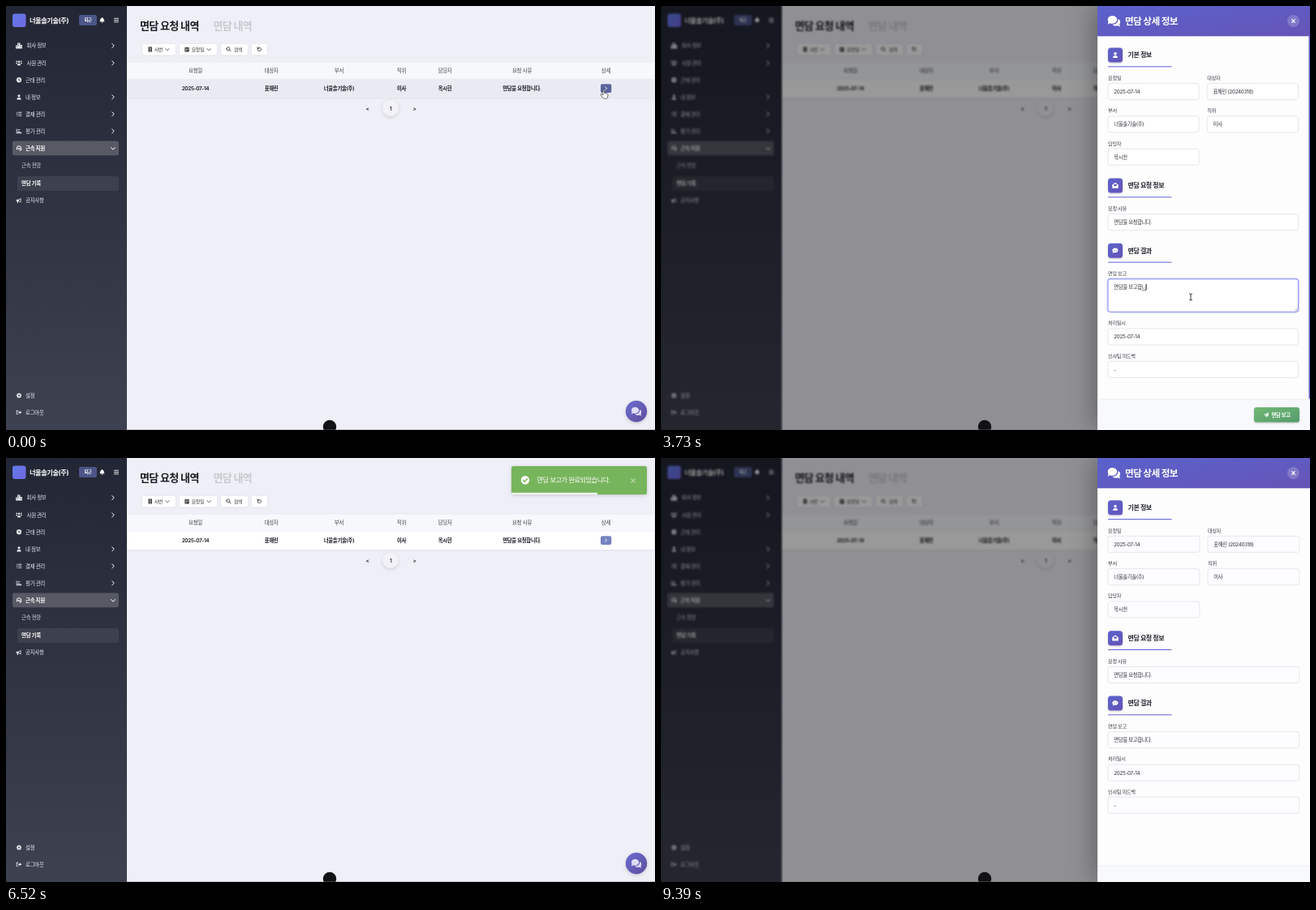
Write an HTML page that moves like this. It is 800 by 523 pixels and loops after 9.42 s.

```html
<!DOCTYPE html>
<html lang="ko">
<head>
<meta charset="utf-8">
<style>
html, body { margin: 0; width: 100%; height: 100%; overflow: hidden; background: #efeff7; }
svg, #shade { position: absolute; left: 0; top: 0; width: 800px; height: 523px; overflow: hidden; }
text { font-family: Inter, "Noto Sans CJK KR", "Noto Sans CJK", sans-serif; letter-spacing: -.05em; white-space: pre; }
#shade { background: rgba(0, 0, 0, .4); backdrop-filter: blur(1.3px); }
#panel { filter: drop-shadow(-6px 0 14px rgba(0, 0, 0, .28)); }
</style>
</head>
<body>
<svg id="page" viewBox="0 0 800 523"></svg>
<div id="shade"></div>
<svg id="badge" viewBox="0 0 800 523"></svg>
<svg id="panel" viewBox="0 0 800 523"></svg>
<svg id="top" viewBox="0 0 800 523"></svg>
<script>
const LOOP = 9420;
const COMPANY = '너울솔기술(주)', MEMBER = '표해린', MANAGER = '옥시헌';
const $ = id => document.getElementById(id);

// Drawing helpers; text is placed by its vertical centre.
const rect = (x, y, w, h, fill, r = 0, more = '') =>
  `<rect x="${x}" y="${y}" width="${w}" height="${h}" rx="${r}" fill="${fill}" ${more}/>`;
const disc = (x, y, r, fill, more = '') => `<circle cx="${x}" cy="${y}" r="${r}" fill="${fill}" ${more}/>`;
const text = (x, y, size, str, fill, weight = 400, anchor = 'start') =>
  `<text x="${x}" y="${y + size * .36}" font-size="${size}" fill="${fill}" font-weight="${weight}" text-anchor="${anchor}">${str}</text>`;
const line = (d, color, width = 1) =>
  `<path d="${d}" fill="none" stroke="${color}" stroke-width="${width}" stroke-linecap="round" stroke-linejoin="round"/>`;
const ring = (x, y, r) => `M${x - r} ${y}a${r} ${r} 0 1 0 ${2 * r} 0a${r} ${r} 0 1 0 ${-2 * r} 0z`;
const gradient = (id, from, to, x2 = 0, y2 = 1) =>
  `<linearGradient id="${id}" x1="0" y1="0" x2="${x2}" y2="${y2}"><stop stop-color="${from}"/><stop offset="1" stop-color="${to}"/></linearGradient>`;
const shadow = (id, dy, blur, opacity) =>
  `<filter id="${id}" x="-30%" y="-50%" width="160%" height="220%"><feDropShadow dx="0" dy="${dy}" stdDeviation="${blur}" flood-opacity="${opacity}"/></filter>`;

// Glyphs on a 16 unit grid.
const gear = Array.from({ length: 8 }, (_, i) => {
  const p = (a, r) => `${8 + r * Math.cos(a)} ${8 + r * Math.sin(a)}`, a = i * Math.PI / 4;
  return `${i ? 'L' : 'M'}${p(a - .24, 7.6)}L${p(a + .24, 7.6)}L${p(a + .36, 5.6)}L${p(a + .43, 5.6)}`;
}).join('') + 'z' + ring(8, 8, 2.4);
const glyphs = {
  city: 'M0 7h4V1h7v5h5v9H0zM6 3h2v2H6zM6 7h2v2H6zM2 9h2v2H2zM12 9h2v2h-2z',
  users: ring(8, 5, 2.6) + ring(2.5, 4, 1.9) + ring(13.5, 4, 1.9) + 'M3.5 14c0-7 9-7 9 0zM0 10c0-4 4-4 4.5-2L3 10zM16 10c0-4-4-4-4.500-2L13 10z',
  clock: ring(8, 8, 7.5) + 'M7 3.500h2v4l3 2-1 1.600-4-2.600z',
  user: ring(8, 4.3, 3.8) + 'M1.500 15.500c0-8.500 13-8.500 13 0z',
  list: 'M6 2h10v2H6zM6 7h10v2H6zM6 12h10v2H6zM0 3l1-1 1 1 2-2 1 1-3 3zM0 8l1-1 1 1 2-2 1 1-3 3zM1 12h2v2H1z',
  chart: 'M0 1h2v12h14v2H0zM4 3h7v2H4zM4 6.500h5v2H4zM4 10h10v2H4z',
  headset: 'M1 9c-1-11 15-11 14 0v3c0 2-2 3-6 3v-2h3V7h1c-2-5-8-5-10 0h1v5H2c-1 0-1-1-1-3zM6 7h4v4H6z',
  horn: 'M0 5h6l8-4v13l-8-4H5l1 5H3l-1-5H0zM8 6v3l4 2V4z',
  gear,
  exit: 'M0 2h6v2H2v8h4v2H0zM5 6.500h5V3l6 5-6 5V9.500H5z',
  bell: 'M7 0h2v1.500c5 1 4 7 6 10.500H1c2-3.500 1-9.500 6-10.500zM6 13h4c0 3-4 3-4 0z',
  card: 'M2 0h12v16H2zM5 3v2h6V3zM5 7v2h2V7zM9 7v2h2V7zM5 11v2h6v-2z',
  date: 'M1 2h3V0h2v2h4V0h2v2h3v14H1zM3 6v2h10V6zM4 10v3h3v-3z',
  chats: 'M6 1c8 0 8 10 0 10-1 0-2 0-3-.5L0 12l1-3C-1 5 1 1 6 1zM13 5c3 1 4 4 2 7l1 3-3-1.500c-3 1-6 0-7-1.500 5 0 8-3 7-7z',
  mail: 'M0 6l8-6 8 6v9H0zM4 4.500v3L8 10l4-2.500v-3z',
  bubble: 'M8 1c10 0 10 12 0 12-1 0-2 0-3-.5L1 15l1-4C-2 7 1 1 8 1z' + ring(4.5, 7, 1) + ring(8, 7, 1) + ring(11.5, 7, 1),
  plane: 'M16 0l-3 14-4-2-3 4v-5l7-8-9 7-4-2z'
};
const icon = (name, x, y, size, fill) =>
  `<path d="${glyphs[name]}" fill="${fill}" fill-rule="evenodd" transform="translate(${x - size / 2} ${y - size / 2}) scale(${size / 16})"/>`;
const right = (x, y, s, c, w) => line(`M${x - s / 2} ${y - s}l${s} ${s}l${-s} ${s}`, c, w);
const down = (x, y, s, c, w) => line(`M${x - s} ${y - s / 2}l${s} ${s}l${s} ${-s}`, c, w);
const cross = (x, y, s, c, w) => line(`M${x - s} ${y - s}l${2 * s} ${2 * s}M${x + s} ${y - s}l${-2 * s} ${2 * s}`, c, w);

function drawSidebar() {
  const menu = [['city', '회사 정보', 49, 1], ['users', '사원 관리', 70.3, 1], ['clock', '근태 관리', 91.2], ['user', '내 정보', 112.3, 1],
    ['list', '결재 관리', 133.3, 1], ['chart', '평가 관리', 154.3, 1], ['horn', '공지사항', 240], ['gear', '설정', 480.5], ['exit', '로그아웃', 501.3]];
  return rect(0, 0, 149, 523, 'url(#side)') + rect(8, 9.5, 16.5, 16.5, 'url(#brand)', 3) +
    text(29, 17.7, 8.2, COMPANY, '#fff', 700) + rect(90, 11, 22, 13, '#4b5587', 2) +
    text(101, 17.5, 5.3, '퇴근', '#fff', 600, 'middle') + icon('bell', 118.5, 17.5, 7, '#fff') +
    line('M133.500 15.300h5M133.500 17.500h5M133.500 19.700h5', '#fff', .9) +
    menu.map(([name, label, y, more]) => {
      const x = name === 'city' || name === 'users' ? 25.5 : 24;
      return icon(name, 16, y, name === 'users' || name === 'city' ? 7.8 : 6.6, '#e8e9ee') + text(x, y, 6.5, label, '#eceef2', 500) +
        (more ? right(132, y, 2.5, '#fff', 1) : '');
    }).join('') +
    rect(8, 166.5, 131, 17.8, '#575a64', 2.5) + icon('headset', 16, 175.4, 7, '#fff') +
    text(24, 175.4, 6.5, '근속 지원', '#fff', 700) + down(132, 175.8, 2.5, '#fff', 1) +
    text(19, 196.5, 6.5, '근속 전망', '#dcdee5', 500) + rect(14, 210, 125, 18, '#3d404d', 2.5) +
    text(19, 219, 6.5, '면담 기록', '#fff', 700);
}

function drawPage() {
  const columns = [[233.5, '요청일', '2025-07-14'], [327, '대상자', MEMBER], [410.5, '부서', COMPANY], [487.5, '직위', '이사'],
    [541, '담당자', MANAGER], [636, '요청 사유', '면담을 요청합니다.'], [739.5, '상세', '']];
  const pill = (x, w) => rect(x, 47, w, 13.3, '#fff', 2.5, 'filter="url(#soft)"');
  $('page').innerHTML = `<defs>${gradient('side', '#232735', '#3e4150')}${gradient('brand', '#5f7bea', '#7367e0', 1)}
    ${gradient('chat', '#6a6cd0', '#5f4f9c', 1)}${shadow('soft', .5, .8, .08)}${shadow('mid', 1.5, 2, .16)}</defs>` +
    rect(149, 0, 651, 523, '#efeff7') + drawSidebar() +
    text(165, 24, 13, '면담 요청 내역', '#1b1d24', 700) + text(255.5, 24, 13, '면담 내역', '#c9cad0', 700) +
    pill(168, 41) + icon('card', 177.7, 53.5, 6, '#333') + text(183, 53.7, 5.9, '사번', '#333') + down(199, 53.7, 2.2, '#333', .8) +
    pill(214, 46) + icon('date', 223, 53.5, 6, '#333') + text(228.7, 53.7, 5.9, '요청일', '#333') + down(250, 53.7, 2.2, '#333', .8) +
    pill(265, 33) + line(ring(273.8, 52.8, 2) + 'M275.300 54.300l1.700 1.700', '#333', .8) + text(281, 53.7, 5.9, '검색', '#333') +
    pill(303, 19) + line('M310 53.500a2.200 2.200 0 1 0 1-2M310 50.700v1.800h1.800', '#333', .8) +
    rect(149, 70, 650, 20.5, '#f7f8fb') + rect(149, 90.5, 650, 22.5, '#fff', 0, 'id="row" filter="url(#soft)"') +
    columns.map(([x, head, cell]) => text(x, 80, 6.5, head, '#40444d', 400, 'middle') +
      text(x, 101.7, 6.4, cell, '#17191f', 600, 'middle')).join('') +
    rect(733, 96.3, 13.3, 10.7, '#7482c0', 2, 'id="detail"') + right(739.7, 101.6, 1.7, '#fff', 1) +
    disc(474, 126, 9.7, '#f2f2f8', 'filter="url(#mid)"') + text(474.2, 126.3, 6.5, '1', '#222', 600, 'middle') +
    text(445.5, 126.3, 6.5, '&lt;', '#222', 600, 'middle') + text(503.5, 126.3, 6.5, '&gt;', '#222', 600, 'middle') +
    disc(777, 500, 13.2, 'url(#chat)', 'filter="url(#mid)"') + icon('chats', 777, 500.3, 12.5, '#dedcf5');
  $('badge').innerHTML = disc(399, 519, 8.2, '#111214') + rect(149, 522.4, 651, .6, '#777', 0, 'opacity=".6"');
}

function drawForm(done) {
  const dy = done ? .7 : 0, wide = done ? 236 : 234.5, half = done ? 113 : 112.3;
  const field = (x, y, w, label, value, h = 20, more = '') => text(x, y, 6.2, label, '#373a42', 500) +
    rect(x, y + 6.9, w, h, done ? '#fdfdff' : '#fff', 3, `stroke="#dfe1e8" stroke-width=".8" ${more}`) +
    text(x + 7.3, y + 17.1, 6.3, value, '#30333b');
  const section = (y, name, label) => rect(551, y - 9, 18, 18, 'url(#head)', 3.5, 'filter="url(#lift)"') +
    icon(name, 560, y, 7.5, '#fff') + text(575.5, y, 8, label, '#22252d', 700) + rect(551, y + 13.8, 78.5, 1, '#6064d2');
  const col = 551 + half + 10;
  return `<g transform="translate(0 ${dy})">` + section(60.5, 'user', '기본 정보') +
    field(551, 88.7, half, '요청일', '2025-07-14') + field(col, 88.7, half, '대상자', MEMBER + ' (20240318)') +
    field(551, 129, half, '부서', COMPANY) + field(col, 129, half, '직위', '이사') + field(551, 169.3, half, '담당자', MANAGER) +
    section(221.5, 'mail', '면담 요청 정보') + field(551, 249.8, wide, '요청 사유', '면담을 요청합니다.') +
    section(301.8, 'bubble', '면담 결과') +
    (done
      ? field(551, 330, wide, '면담 보고', '면담을 보고합니다.') + field(551, 370.5, wide, '처리일시', '2025-07-14') +
        field(551, 410.7, wide, '인사팀 피드백', '-')
      : rect(551, 336.8, wide, 40.3, 'none', 3, 'id="glow" stroke="#6670ee" stroke-width="3.200"') +
        field(551, 330, wide, '면담 보고', '', 40.3, 'id="area"') +
        `<text id="typed" x="558.300" y="349.200" font-size="6.300" fill="#30333b"></text>` +
        rect(0, 343.3, .7, 6.8, '#333', 0, 'id="caret"') + line('M781.500 376l3-3M783.500 376l1-1', '#777', .6) +
        field(551, 391, wide, '처리일시', '2025-07-14') + field(551, 431.5, wide, '인사팀 피드백', '-')) + '</g>' +
    (done
      ? rect(538, 503, 262, 20, '#f8f9fc') + rect(538, 502.7, 262, .7, '#e6e8ee')
      : rect(538, 485, 262, 38, '#f8f9fc') + rect(538, 484.7, 262, .7, '#e6e8ee') + rect(798.5, 37, 1.5, 447.5, '#5f62cb') +
        '<g id="send">' + rect(731, 495, 56, 18.5, 'url(#green)', 3, 'filter="url(#lift)"') +
        icon('plane', 746, 504.3, 6.3, '#fff') + text(752.5, 504.3, 6.4, '면담 보고', '#fff', 700) + '</g>');
}

function drawPanel() {
  $('panel').innerHTML = `<defs>${gradient('head', '#5a62cd', '#6654b6', 1)}${gradient('green', '#72b974', '#559b6d', 1)}
    ${shadow('lift', 1, 1.2, .2)}</defs><g id="drawer">` +
    rect(538, 0, 262, 523, '#fdfdfe') + rect(538, 0, 262, 37.3, 'url(#head)') + icon('chats', 558.3, 18.8, 15.5, '#fff') +
    text(572, 18.7, 11.6, '면담 상세 정보', '#fff', 700) + disc(779.5, 18.5, 7.5, '#fff', 'fill-opacity=".2"') +
    cross(779.5, 18.5, 1.8, '#fff', 1.2) + `<g id="edit">${drawForm(false)}</g><g id="done">${drawForm(true)}</g></g>`;
}

function drawTop() {
  const hand = 'M-1 0c0-1.400 1.800-1.400 1.800 0v3.500l3 .6c1 .2 1.300.8 1.200 1.800l-.5 3c-.2 1-.6 1.300-1.300 1.300H.3c-.7 0-1-.3-1.500-1L-3.600 6c-.7-1 .4-1.900 1.300-1.100L-1 6z';
  $('top').innerHTML = `<defs>${shadow('cast', 1, 2, .18)}</defs><g id="toast">` +
    rect(623, 10, 167, 35, '#77b55c', 2.5, 'filter="url(#cast)"') + disc(640, 27.3, 5.2, '#fff') +
    line('M637.500 27.500l1.800 1.800l3.300-3.600', '#77b55c', 1.3) + text(654.5, 27.5, 8.1, '면담 보고가 완료되었습니다.', '#fff') +
    cross(773, 27.8, 2.1, '#b0d59f', 1.4) + rect(623, 42.8, 167, 2.2, '#f1f7ee', 0, 'id="progress"') + '</g><g id="cursor">' +
    `<path id="hand" d="${hand}" fill="#fff" stroke="#333" stroke-width=".7"/>` +
    '<path id="arrow" d="M0 0v7.800l1.900-1.700 1.300 3 1.300-.6-1.300-2.900h2.500z" fill="#fff" stroke="#333" stroke-width=".6"/>' +
    `<g id="beam">${line('M-1.500-4q1.500 0 1.500 1v6q0 1-1.500 1M1.500-4q-1.500 0-1.500 1M0 3q0 1 1.500 1', '#222', .9)}</g></g>`;
}

drawPage();
drawPanel();
drawTop();

const clamp = v => Math.max(0, Math.min(1, v));
const ramp = (t, from, to) => clamp((t - from) / (to - from));
const easeOut = v => 1 - (1 - v) ** 3;
const smooth = v => v * v * (3 - 2 * v);
const show = (id, on) => $(id).setAttribute('visibility', on ? 'inherit' : 'hidden');
const set = (id, name, value) => $(id).setAttribute(name, value);

// Follows [time, ...values] stops with the given easing between neighbours.
function follow(t, stops, ease) {
  const i = stops.findIndex(s => s[0] > t);
  if (i === 0) return stops[0].slice(1);
  if (i < 0) return stops[stops.length - 1].slice(1);
  const a = stops[i - 1], b = stops[i], k = ease(ramp(t, a[0], b[0]));
  return a.slice(1).map((v, n) => v + (b[n + 1] - v) * k);
}

// Successive states of the Korean input method, "settled|composing".
const strokes = ['|ㅁ', '|며', '|면', '면|ㄷ', '면|다', '면|담', '면담|ㅇ', '면담|으', '면담|을', '면담을 |', '면담을 |ㅂ', '면담을 |보',
  '면담을 |복', '면담을 보|고', '면담을 보|곻', '면담을 보고|하', '면담을 보고|합', '면담을 보고합|ㄴ', '면담을 보고합|니',
  '면담을 보고합|닏', '면담을 보고합니|다', '면담을 보고합니다.|'];
const FIRST_KEY = 1980, KEY = 96, TYPED = FIRST_KEY + KEY * strokes.length;
const TOAST = 5425, TOAST_LIFE = 3000;
const path = [[0, 737, 104], [850, 737, 104], [1600, 653, 359], [4580, 653, 359], [5250, 752, 505], [5600, 752, 505], [6100, 815, 530],
  [6850, 815, 260], [7350, 742, 103], [8450, 742, 103], [9000, 812, 70]];
const slide = [[TOAST, 200], [TOAST + 450, -11], [TOAST + 560, 4], [TOAST + 675, -2], [TOAST + 750, 0],
  [TOAST + TOAST_LIFE, 0], [TOAST + TOAST_LIFE + 120, -8], [TOAST + TOAST_LIFE + 450, 200]];

function drawText(t) {
  const count = Math.min(strokes.length, Math.floor((t - FIRST_KEY) / KEY) + 1);
  const [settled, composing] = count > 0 ? strokes[count - 1].split('|') : ['', ''];
  const typed = $('typed');
  typed.innerHTML = settled + `<tspan text-decoration="underline">${composing}</tspan>`;
  const blinkOn = t < TYPED || (t - TYPED) % 1000 < 500;
  show('caret', t > 1750 && t < 5300 && blinkOn);
  set('caret', 'x', 558.5 + (settled + composing ? typed.getComputedTextLength() : 0));
  const focus = ramp(t, 1750, 1950) * (1 - ramp(t, 5280, 5480));
  set('glow', 'stroke-opacity', .3 * focus);
  set('area', 'stroke', `rgb(${223 - 101 * focus},${225 - 95 * focus},${232 + 6 * focus})`);
}

function render(t) {
  const second = t > 6500;
  const open = second ? easeOut(ramp(t, 7480, 7830)) : easeOut(ramp(t, 250, 600)) * (1 - easeOut(ramp(t, 5440, 5790)));
  $('shade').style.opacity = open;
  $('shade').style.display = $('panel').style.display = open > 0 ? '' : 'none';
  set('drawer', 'transform', `translate(${262 * (1 - open)} 0)`);
  show('edit', !second);
  show('done', second);
  drawText(t);

  const hover = t < 250 || (t > 7300 && t < 7480);
  set('row', 'fill', hover ? '#eaebf2' : '#fff');
  set('detail', 'fill', hover ? '#5b659f' : '#7482c0');
  const onSend = t > 5150 && t < 5600;
  set('send', 'transform', `translate(0 ${onSend ? -.7 : 0})`);

  show('toast', t > TOAST && t < TOAST + TOAST_LIFE + 450);
  set('toast', 'transform', `translate(${follow(t, slide, easeOut)} 0)`);
  set('progress', 'width', 167 * (1 - ramp(t, TOAST, TOAST + TOAST_LIFE)));

  const [x, y] = follow(t, path, smooth);
  const kind = hover || onSend ? 'hand' : t > 1400 && t < 4850 ? 'beam' : 'arrow';
  ['hand', 'arrow', 'beam'].forEach(k => show(k, k === kind));
  set('cursor', 'transform', `translate(${x} ${y})`);
}

function tick() {
  render(performance.now() % LOOP);
  requestAnimationFrame(tick);
}
tick();
</script>
</body>
</html>
```
